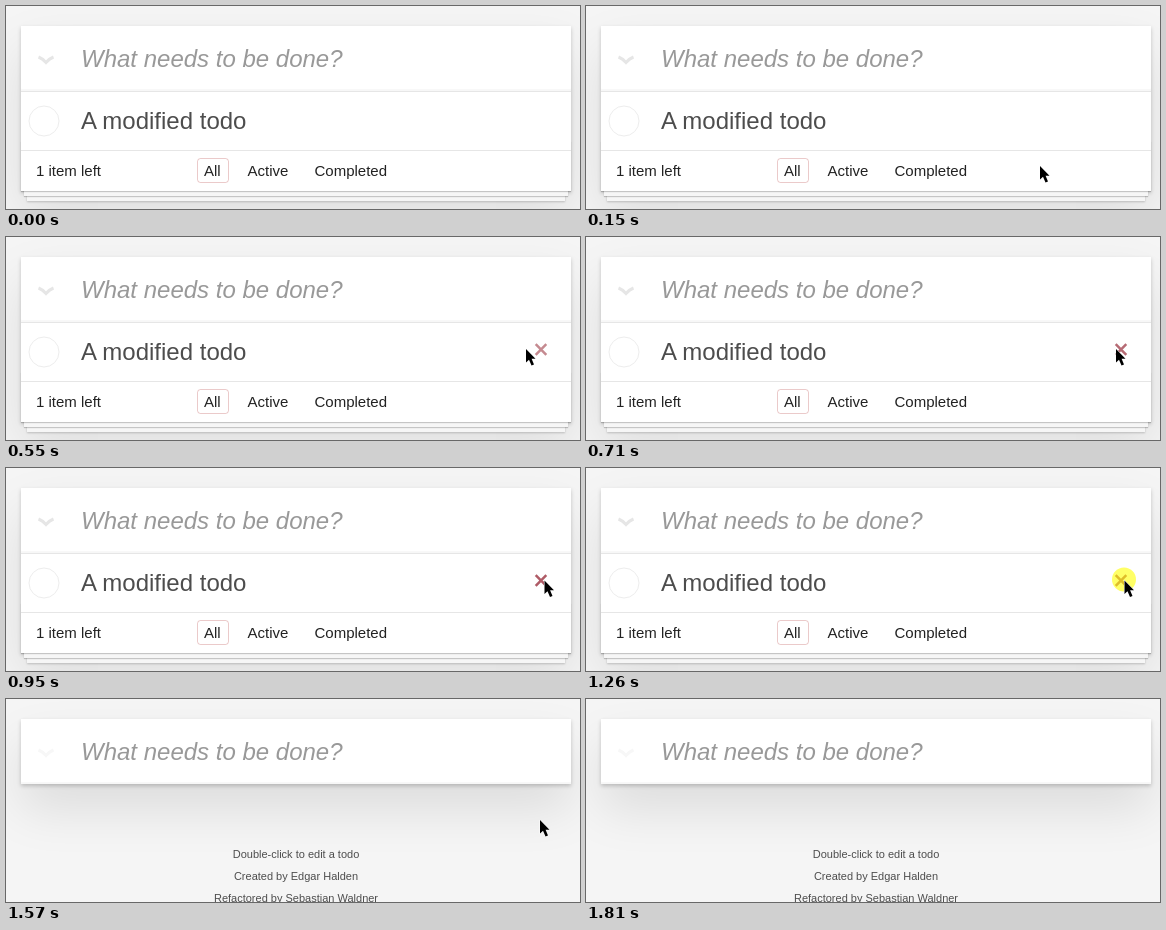
These frames come from a looping animation (574x203 px, 2200 ms). An HTML page:

```html
<!DOCTYPE html>
<html lang="en">
<head>
<meta charset="utf-8">
<style>
html, body { margin: 0; width: 100%; height: 100%; overflow: hidden; background: #f5f5f5; }
div, svg { position: absolute; left: 0; top: 0; }
#card {
  left: 15px; top: 20px; width: 550px; background: #fff;
  box-shadow: 0 2px 4px rgba(0,0,0,.2), 0 25px 50px rgba(0,0,0,.1);
}
#stack {
  left: 15px; top: 135px; width: 550px; height: 50px;
  box-shadow: 0 1px 1px rgba(0,0,0,.2), 0 8px 0 -3px #f6f6f6, 0 9px 1px -3px rgba(0,0,0,.2),
    0 16px 0 -6px #f6f6f6, 0 17px 2px -6px rgba(0,0,0,.2);
}
#field { left: 15px; top: 20px; width: 550px; height: 65px; box-shadow: inset 0 -2px 1px rgba(0,0,0,.03); }
svg { font-family: "Liberation Sans", Arial, sans-serif; }
.big { font-size: 24px; }
.foot { font-size: 15px; fill: #222; }
.info { font-size: 11px; fill: #4d4d4d; text-anchor: middle; }
</style>
</head>
<body>
<div id="card"></div>
<div id="stack"></div>
<div id="field"></div>
<svg width="574" height="203" fill="none">
  <path id="chevron" d="M32.5 51q4 1.5 7.5 5.5q3.500-4 7.500-5.500" stroke-width="3"/>
  <text class="big" x="75" y="61" font-style="italic" fill="#999">What needs to be done?</text>
  <g id="list">
    <path d="M15 85.500H565M15 144.500H565" stroke="#e6e6e6"/>
    <circle cx="38" cy="115" r="15" stroke="#ededed"/>
    <text class="big" x="75" y="123" fill="#4d4d4d">A modified todo</text>
    <path id="remove" d="M529.700 107.200L540.300 117.800M540.300 107.200L529.700 117.800" stroke-width="2.500"/>
    <g class="foot">
      <text x="30" y="170">1 item left</text>
      <text x="198" y="170">All</text>
      <text x="241.500" y="170">Active</text>
      <text x="308.500" y="170">Completed</text>
    </g>
    <rect x="191.500" y="152.500" width="31" height="24" rx="3" stroke="#af2f2f" stroke-opacity=".25"/>
  </g>
  <g id="info" class="info">
    <text x="290" y="159">Double-click to edit a todo</text>
    <text x="290" y="181">Created by Edgar Halden</text>
    <text x="290" y="203">Refactored by Sebastian Waldner</text>
  </g>
  <circle id="click" cx="538" cy="111.500" r="12" fill="#ff0" fill-opacity=".6"/>
  <path id="cursor" d="M0 0V13.500L3 10.700L5.500 16.500L8 15.500L5.600 9.800H9.500Z" fill="#000" stroke="#fff" stroke-width="1" paint-order="stroke"/>
</svg>
<script>
const LOOP = 2200, STEP = 80;
const el = id => document.getElementById(id);
const show = (id, on) => { el(id).style.visibility = on ? 'visible' : 'hidden'; };

// Each run holds one pointer position per step
const runs = [
  { at: 70, points: [[455, 186], [454, 160], [461, 128], [474, 111], [493, 110], [510, 111], [520, 112],
    [525, 112], [530, 112], [534, 112], [537, 112], [538.5, 112.5]] },
  { at: 1570, points: [[534, 121], [524, 150], [510, 179], null] }
];

function pointer(t) {
  const run = runs.filter(r => t >= r.at).pop();
  if (!run) return null;
  const i = Math.floor((t - run.at) / STEP);
  return run.points[Math.min(i, run.points.length - 1)];
}

function removeColor(t) {
  const k = Math.min(1, Math.max(0, (Math.floor((t - 70) / STEP) * STEP - 400) / 320));
  const mix = (a, b) => Math.round(a + (b - a) * k);
  return `rgb(${mix(204, 175)},${mix(154, 91)},${mix(158, 102)})`;
}

function draw(now) {
  const t = now % LOOP, open = t < 1340, p = pointer(t);
  el('card').style.height = (open ? 165 : 65) + 'px';
  show('stack', open);
  show('list', open);
  show('info', !open);
  show('remove', open && p && p[1] < 144);
  show('click', t >= 1260 && open);
  show('cursor', p);
  el('chevron').setAttribute('stroke', open ? '#e6e6e6' : '#f7f7f7');
  el('remove').setAttribute('stroke', removeColor(t));
  if (p) el('cursor').setAttribute('transform', `translate(${p})`);
  requestAnimationFrame(draw);
}
requestAnimationFrame(draw);
</script>
</body>
</html>
```
